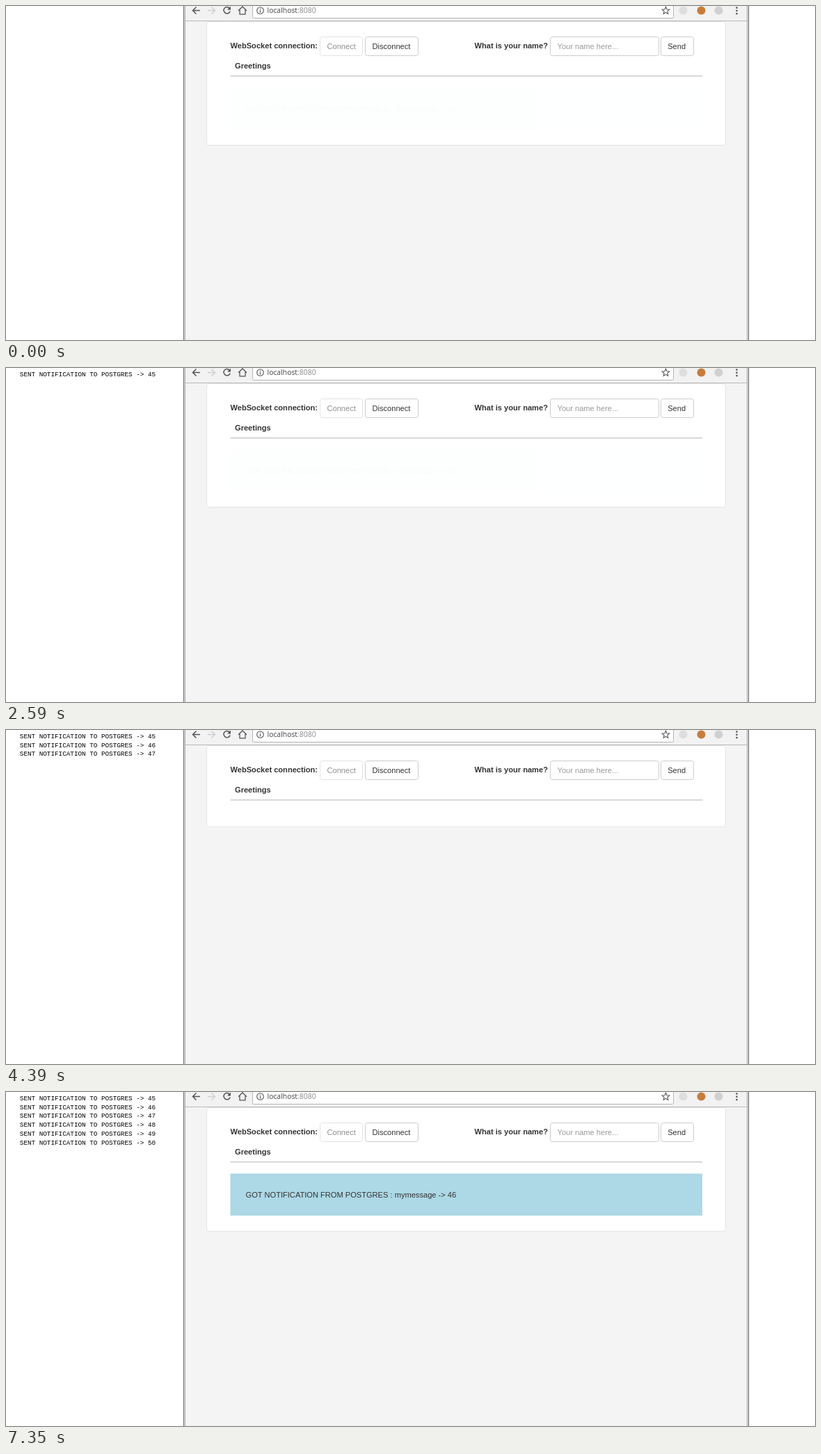
These frames come from a looping animation (1163x481 px, 8000 ms). An HTML page:

```html
<!DOCTYPE html>
<html lang="en">
<head>
<meta charset="utf-8">
<title>WebSocket notifications</title>
<style>
html, body { margin: 0; width: 100%; height: 100%; overflow: hidden; background: #fff; }
svg { display: block; width: 1163px; height: 481px; }
text { font: 11.1px "Liberation Sans", Arial, sans-serif; fill: #333; white-space: pre; }
.bold { font-weight: bold; }
.url { font: 10.4px "Open Sans", "Noto Sans", sans-serif; fill: #444; }
.port { fill: #888; }
.log text { font: 9.3px "Liberation Mono", "Courier New", monospace; fill: #000; }
.box { fill: #fff; stroke: #ccc; }
.icon { fill: none; stroke: #555; stroke-width: 1.5; }
</style>
</head>
<body>
<svg viewBox="0 0 1163 481">
  <!-- browser window -->
  <rect x="255" width="814" height="481" fill="#f4f4f4"/>
  <rect x="258" width="807" height="21" fill="#f2f2f2"/>
  <rect x="258" y="21" width="807" height="1" fill="#b8b8b8"/>
  <path d="M255.5 0V481M1067.5 0V481" stroke="#666"/>
  <path d="M256.5 0V481M1066.5 0V481" stroke="#e8e8e8"/>
  <path d="M257.5 0V481M1065.5 0V481" stroke="#aaa"/>

  <!-- toolbar -->
  <path class="icon" d="M279 6.5H268.5M273.5 1.5L268.5 6.5L273.5 11.5"/>
  <path class="icon" d="M290 6.5H300.5M295.5 1.5L300.5 6.5L295.5 11.5" style="stroke:#d0d0d0"/>
  <path class="icon" d="M321.4 3.2A4.7 4.7 0 1 0 322.2 7.5"/>
  <path d="M323 .5V5.5H318Z" fill="#555"/>
  <path class="icon" d="M334 6.7L340 1L346 6.7M336 5.5V11.8H344V5.5" style="stroke-width:1.3"/>
  <rect class="box" x="354.5" y="-8.5" width="605" height="26" rx="2" style="stroke:#b5b5b5"/>
  <circle class="icon" cx="365.5" cy="6.5" r="4.8" style="stroke-width:1.1"/>
  <path d="M365.5 3.5V4.8M365.5 5.8V9.6" stroke="#555" stroke-width="1.2"/>
  <text class="url" x="375.5" y="10">localhost<tspan class="port">:8080</tspan></text>
  <path id="star" class="icon" style="stroke-width:1.1"/>
  <circle cx="973.5" cy="6.5" r="6" fill="#dedede"/>
  <circle cx="999.5" cy="6.5" r="6" fill="#c77c3c"/>
  <circle cx="1024.5" cy="6.5" r="6" fill="#d0d0d0"/>
  <g fill="#555">
    <circle cx="1050.5" cy="2.5" r="1.3"/>
    <circle cx="1050.5" cy="6.8" r="1.3"/>
    <circle cx="1050.5" cy="11.1" r="1.3"/>
  </g>

  <!-- page -->
  <rect id="panel" x="288.5" y="22.5" width="746" height="178" rx="3.5" fill="#fff" stroke="#e5e5e5"/>
  <text class="bold" x="322.5" y="61">WebSocket connection:</text>
  <g opacity=".55">
    <rect class="box" x="451.5" y="44.5" width="61" height="27" rx="3"/>
    <text x="461.5" y="62">Connect</text>
  </g>
  <rect class="box" x="516.5" y="44.5" width="76" height="27" rx="3"/>
  <text x="526.5" y="62">Disconnect</text>
  <text class="bold" x="673.5" y="61">What is your name?</text>
  <rect class="box" x="782.5" y="44.5" width="156" height="27" rx="3"/>
  <text x="792.5" y="62" style="fill:#999">Your name here...</text>
  <rect class="box" x="941.5" y="44.5" width="47" height="27" rx="3"/>
  <text x="951.2" y="62">Send</text>
  <text class="bold" x="329" y="89.5">Greetings</text>
  <rect x="322.5" y="100" width="678.5" height="1.5" fill="#ccc"/>
  <g id="banner">
    <rect x="322.5" y="117.5" width="678.5" height="60.5" fill="#add8e6"/>
    <text id="message" x="344.6" y="152"></text>
  </g>

  <g id="log" class="log"></g>
</svg>
<script>
const LOOP = 8000;
const $ = id => document.getElementById(id);

// Redraw bursts: first moment, last moment, number of redraws
const bursts = [
  [0, 0, 1], [70, 340, 5], [2120, 2910, 11], [3070, 3380, 5], [4390, 4390, 1],
  [5160, 5410, 4], [5470, 5470, 1], [5630, 5870, 4], [6140, 6430, 5], [7350, 7350, 1]
];
const ticks = bursts.flatMap(([a, b, n]) =>
  Array.from({ length: n }, (_, i) => Math.round(a + (b - a) * i / Math.max(1, n - 1))));

// Fades: start, end, opacity from, opacity to
const fades = [
  [0, 360, .015, 1], [2080, 2480, 1, 0], [2480, 2890, 0, 1], [2970, 3380, 1, 0],
  [5130, 5530, 0, 1], [5515, 5915, 1, 0], [6070, 6450, 0, 1]
];
const logTimes = [2430, 3380, 4390, 5400, 6350, 7350];
const HIDE = 3380, SHOW = 5160;

const swing = p => .5 - Math.cos(Math.PI * p) / 2;
const lastUpTo = (list, t, key) => list.filter(v => key(v) <= t).pop();

function opacityAt(t) {
  const [start, end, from, to] = lastUpTo(fades, t, f => f[0]);
  return from + (to - from) * swing(Math.min(1, (t - start) / (end - start)));
}

const lines = logTimes.map((_, i) => {
  const line = document.createElementNS("http://www.w3.org/2000/svg", "text");
  line.setAttribute("x", 19.8);
  line.setAttribute("y", 12 + Math.round(12.7 * i));
  line.textContent = `SENT NOTIFICATION TO POSTGRES -> ${45 + i}`;
  $("log").append(line);
  return line;
});

const starPoints = Array.from({ length: 10 }, (_, i) => {
  const r = i % 2 ? 2.5 : 5.6, a = Math.PI * (i / 5 - .5);
  return `${948.5 + r * Math.cos(a)} ${6.8 + r * Math.sin(a)}`;
});
$("star").setAttribute("d", `M${starPoints.join("L")}Z`);

function draw(time) {
  const t = lastUpTo(ticks, time, v => v);
  const open = t < HIDE || t >= SHOW;
  $("panel").setAttribute("height", open ? 178 : 117);
  $("banner").setAttribute("display", open ? "inline" : "none");
  $("banner").setAttribute("opacity", opacityAt(t));
  $("message").textContent = `GOT NOTIFICATION FROM POSTGRES : mymessage -> ${t < SHOW ? 42 : 46}`;
  lines.forEach((line, i) => line.setAttribute("display", t >= logTimes[i] ? "inline" : "none"));
}

const begin = performance.now();
function frame() {
  draw((performance.now() - begin) % LOOP);
  requestAnimationFrame(frame);
}
frame();
</script>
</body>
</html>
```
